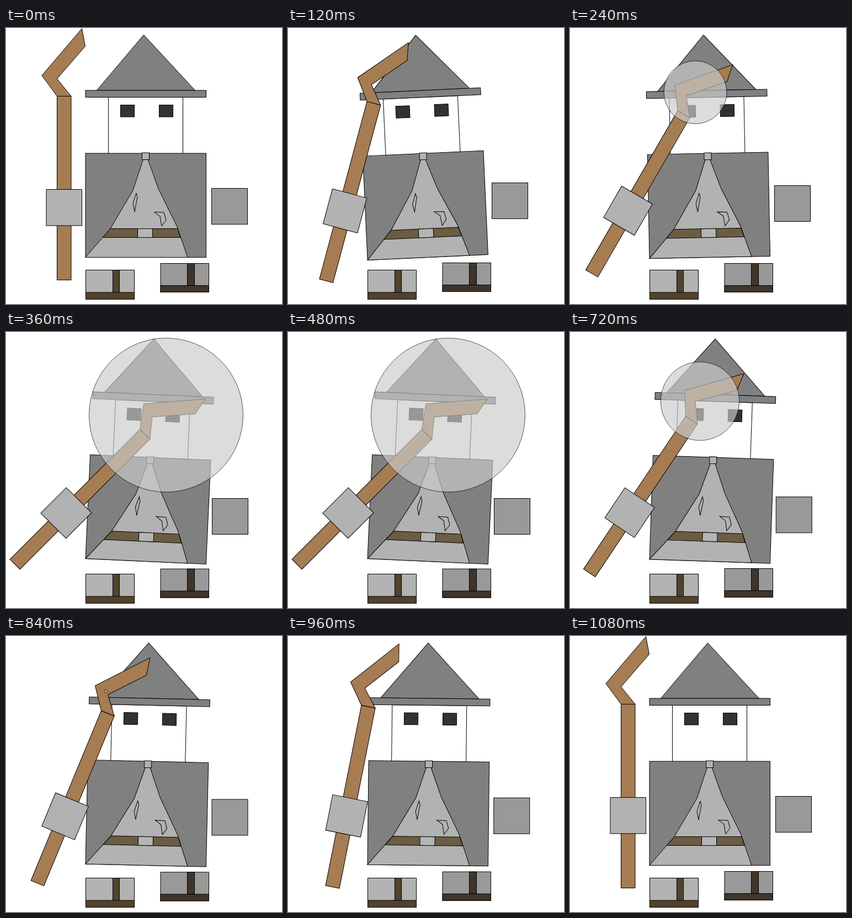
These frames come from a looping animation (500x500 px, 1200 ms). An HTML page:

```html
<!DOCTYPE html>
<html lang="en">
<head>
<meta charset="utf-8">
<title>Wizard casting</title>
<style>
  html, body { margin: 0; width: 100%; height: 100%; overflow: hidden; background: #fff; }
  svg { display: block; width: 100vw; height: 100vh; }
  svg * { stroke-width: 1; }

  .dark { fill: #808080; }
  .mid { fill: #999; }
  .light { fill: #b2b2b2; }
  .face { fill: #fff; }
  .eye { fill: #323232; }
  .wood { fill: #a67c52; }
  .belt { fill: #6a5d42; }
  .leather { fill: #50432d; }
  .shade { fill: #40352a; }

  #body, #staff, #hand, #foot, #orb { animation: 1.2s step-end infinite; }
  #body { transform-origin: 253px 415px; animation-name: lean; }
  #staff { transform-origin: 105px 325px; animation-name: swing; }
  #hand { animation-name: reach; }
  #foot { animation-name: tap; }
  #orb { fill: #cbcbcb; opacity: .67; animation-name: glow; }

  /* Wind up, strike, hold, then ease back in four equal steps. */
  @keyframes lean {
    0%, 90%, 100% { rotate: 0deg; }
    10% { rotate: -2.6deg; }
    20% { rotate: -1.1deg; }
    30% { rotate: 2.6deg; }
    50% { rotate: 2.6deg; animation-timing-function: steps(4); }
  }
  @keyframes swing {
    0%, 90%, 100% { translate: 0px 0px; rotate: 0deg; }
    10% { translate: -2px 6px; rotate: 15deg; }
    20% { translate: 0px 5.7px; rotate: 30deg; }
    30% { translate: 4px 2.5px; rotate: 45deg; }
    50% { translate: 4px 2.5px; rotate: 45deg; animation-timing-function: steps(4); }
  }
  @keyframes reach {
    0%, 90%, 100% { translate: 0px 0px; }
    10% { translate: -3px -10px; }
    20% { translate: -2px -5px; }
    30% { translate: 1px 11px; }
    50% { translate: 1px 11px; animation-timing-function: steps(4); }
  }
  @keyframes tap {
    0%, 20%, 90%, 100% { translate: 0px 0px; }
    10% { translate: 0px -1px; }
    30% { translate: 0px 2.7px; }
    50% { translate: 0px 2.7px; animation-timing-function: steps(4); }
  }
  @keyframes glow {
    0%, 80%, 100% { cx: 181px; cy: 100px; r: 0px; }
    20% { cx: 227px; cy: 116.5px; r: 57px; }
    30% { cx: 290px; cy: 150.5px; r: 139.5px; }
    50% { cx: 290px; cy: 150.5px; r: 139.5px; animation-timing-function: steps(2); }
    70% { cx: 181px; cy: 100px; r: 2.8px; }
  }
</style>
</head>
<body>
<svg viewBox="0 0 500 500" stroke="#000">
  <g id="left-foot">
    <rect class="light" x="144.5" y="438.5" width="88" height="53"/>
    <rect class="leather" x="193.5" y="438.5" width="12" height="41"/>
    <rect class="leather" x="144.5" y="479" width="88" height="12.5"/>
  </g>
  <g id="foot">
    <rect class="mid" x="280" y="426.5" width="87.5" height="52"/>
    <rect class="shade" x="328.5" y="426.5" width="13" height="40"/>
    <rect class="shade" x="280" y="466.5" width="87.5" height="12"/>
  </g>
  <rect id="hand" class="mid" x="372.5" y="290.5" width="65" height="65"/>

  <g id="body">
    <rect class="face" x="185.5" y="125.5" width="135" height="102"/>
    <rect class="eye" x="207.5" y="139.5" width="25" height="21.5"/>
    <rect class="eye" x="277.5" y="139.5" width="25" height="21.5"/>
    <path class="dark" d="M249.5 12.5 342.5 113H164.5Z"/>
    <rect class="dark" x="144" y="113" width="218.5" height="12.5"/>
    <rect class="dark" x="144" y="227" width="218.5" height="188.5"/>
    <path class="light" d="M248.5 238 230 294 189 363.5 144 415.5H329L310 360 276 291 257 238Z"/>
    <path class="belt" d="M189 363.5H311L316 379.5H175.5Z"/>
    <rect x="238.5" y="363.5" width="27" height="16" fill="#b5b5b5"/>
    <rect class="light" x="246.5" y="226" width="13" height="12.5"/>
    <path class="light" d="M236 299 238 306 233 333 230 318Z"/>
    <path class="light" d="M268.5 333.5 286 334 290 348 282 359 279 341Z"/>
  </g>

  <g id="staff">
    <rect class="wood" x="92.5" y="123.5" width="25.5" height="333"/>
    <path class="wood" d="M92.5 123.5 65 86 137.5 1 143.5 33 92.5 92 118 123.5Z"/>
    <rect class="light" x="73" y="292.5" width="64.5" height="65.5"/>
  </g>

  <circle id="orb"/>
</svg>
</body>
</html>
```
